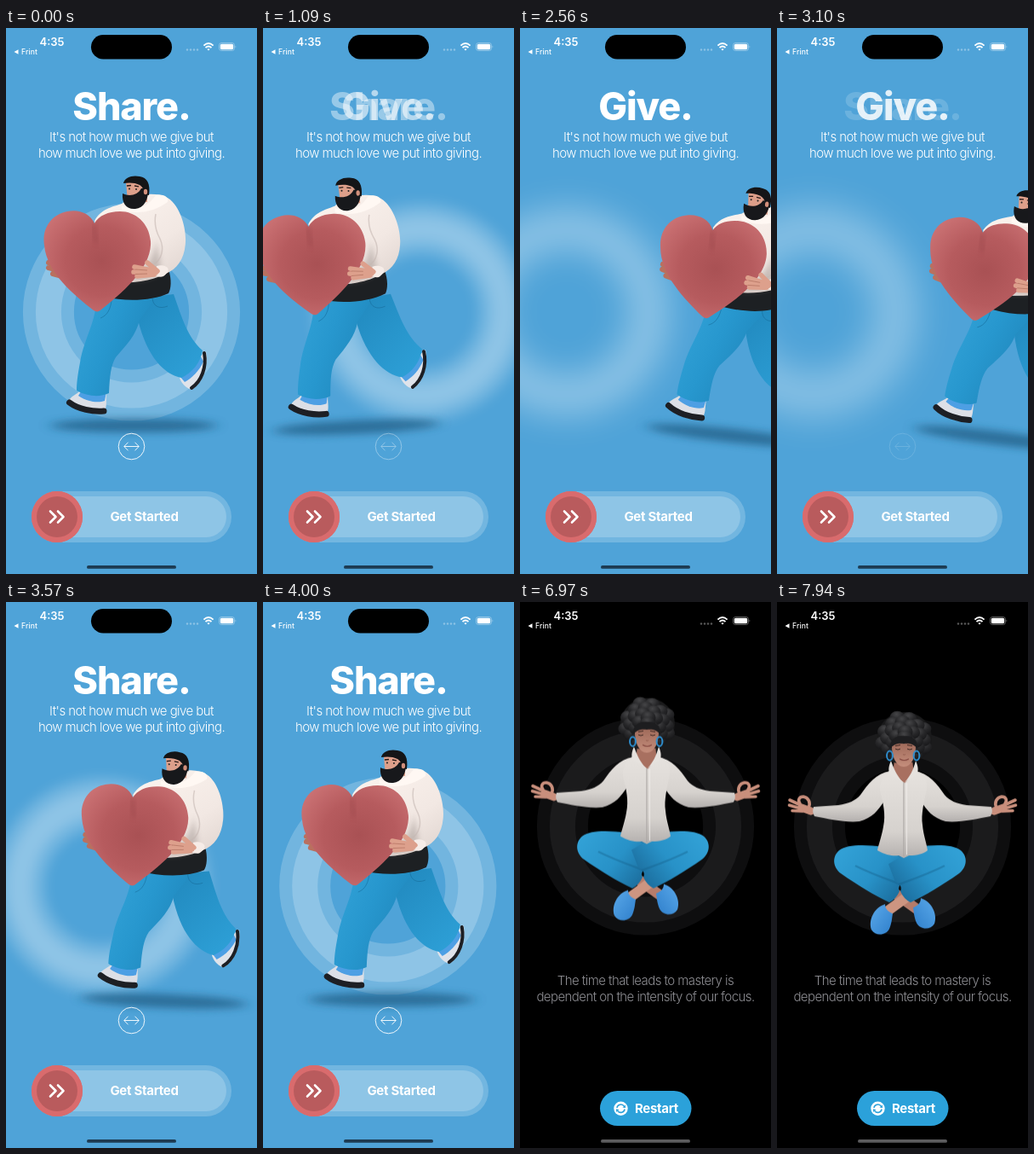
Recreate the animation shown at these times as an HTML page. Size 295x640 px, loop 8 s.

```html
<!DOCTYPE html>
<html lang="en">
<head>
<meta charset="utf-8">
<title>Onboarding</title>
<style>
@property --w { syntax: "<number>"; inherits: true; initial-value: 0; }
@property --give { syntax: "<number>"; inherits: true; initial-value: 0; }
@property --slide { syntax: "<number>"; inherits: true; initial-value: 0; }

html, body { margin: 0; width: 100%; height: 100%; overflow: hidden; background: #000; }
#stage {
  position: absolute; left: 0; top: 0; width: 295px; height: 640px; overflow: hidden;
  font-family: Inter, "Open Sans", sans-serif; color: #fff;
}
#stage > div, .layer { position: absolute; left: 0; top: 0; width: 295px; height: 640px; }
svg { display: block; overflow: visible; }
text { fill: #fff; text-anchor: middle; }
.title { font-size: 45px; font-weight: 800; letter-spacing: -.026em; }
.body { font-size: 15px; font-weight: 300; }
.body text, text.body { letter-spacing: -.038em; }
.label { font-size: 15px; font-weight: 700; letter-spacing: -.02em; }
#home .body text { fill: #8d8d92; }

/* drag distance, title fade and slider all hang on three numbers */
#intro {
  background: #4fa3d8;
  animation: drag 8s infinite, fade 8s linear infinite, slide 8s infinite, leave 8s step-end infinite;
}
#halo {
  transform: translateX(calc(var(--w) * -.75px));
  filter: blur(calc(max(var(--w), -1 * var(--w)) * .15px));
}
#runner {
  transform-origin: 147.5px 333px;
  transform: rotate(calc(var(--w) * .05deg)) translateX(calc(var(--w) * .9px));
}
.give { opacity: var(--give); }
.share { opacity: calc(1 - var(--give)); }
#fill {
  position: absolute; left: 30px; top: 543px; height: 60px; border-radius: 30px;
  width: calc(60px + var(--slide) * 1px); background: #d96b6d;
}
#knob { transform: translateX(calc(var(--slide) * 1px)); }

#home { background: #000; animation: enter 8s step-end infinite; }
#rings { transform-origin: 147.5px 263px; animation: rings 8s infinite; }
#sitter { animation: bob 8s infinite; }
.bar { animation: bar 8s step-end infinite; }

@keyframes drag {
  0% { --w: 0; }
  11% { --w: 0; animation-timing-function: cubic-bezier(.3, .4, .7, .9); }
  13.625% { --w: -51; animation-timing-function: ease-out; }
  14.875% { --w: -63; animation-timing-function: cubic-bezier(.25, .1, .5, 1); }
  25.6% { --w: 0; }
  27.6% { --w: 0; animation-timing-function: cubic-bezier(.2, .2, .6, .85); }
  32% { --w: 124; animation-timing-function: ease-out; }
  38.25% { --w: 150; animation-timing-function: ease-out; }
  50.75%, 100% { --w: 0; }
}
@keyframes fade {
  0%, 11.6% { --give: 0; }
  13.625% { --give: .58; }
  14.2% { --give: .74; }
  17%, 27.75% { --give: 0; }
  30.9%, 38.25% { --give: 1; }
  41.4%, 100% { --give: 0; }
}
@keyframes slide {
  0%, 63.6% { --slide: 0; animation-timing-function: ease-in-out; }
  67.2%, 100% { --slide: 175; }
}
@keyframes leave { 0% { visibility: visible; } 69.375%, 100% { visibility: hidden; } }
@keyframes enter { 0% { visibility: hidden; } 69.375%, 100% { visibility: visible; } }
@keyframes bar { 0% { fill: #1d3b52; } 69.375%, 100% { fill: #5c5c5e; } }
@keyframes rings {
  0%, 69.375% { opacity: 0; transform: scale(.5); filter: blur(7.5px); animation-timing-function: ease-out; }
  81.9%, 100% { opacity: 1; transform: none; filter: blur(0); }
}
@keyframes bob {
  0%, 76.375% { transform: none; animation-timing-function: cubic-bezier(.44, 0, .73, .52); }
  100% { transform: translateY(22.4px); }
}
</style>
</head>
<body>
<div id="stage">

<svg width="0" height="0" style="position:absolute">
  <defs>
    <radialGradient id="heart" cx=".54" cy=".5" r=".62">
      <stop offset="0" stop-color="#a95154"/><stop offset=".55" stop-color="#b65b5e"/><stop offset="1" stop-color="#ca7173"/>
    </radialGradient>
    <linearGradient id="cloth" x1=".2" y1="0" x2=".9" y2="1">
      <stop offset="0" stop-color="#fbf3ee"/><stop offset=".6" stop-color="#f2e8e3"/><stop offset="1" stop-color="#dfd4cf"/>
    </linearGradient>
    <linearGradient id="jean" x1="0" y1="0" x2="1" y2=".5">
      <stop offset="0" stop-color="#33a3d8"/><stop offset=".5" stop-color="#2797ce"/><stop offset="1" stop-color="#1f86bb"/>
    </linearGradient>
    <linearGradient id="jeanBack" x1="0" y1="0" x2=".8" y2="1">
      <stop offset="0" stop-color="#2087bc"/><stop offset="1" stop-color="#2d9fd6"/>
    </linearGradient>
    <linearGradient id="jacket" x1="0" y1="0" x2="0" y2="1">
      <stop offset="0" stop-color="#e6e2de"/><stop offset=".7" stop-color="#d6d2ce"/><stop offset="1" stop-color="#b4b0ae"/>
    </linearGradient>
    <linearGradient id="knee" x1="0" y1="0" x2="1" y2=".6">
      <stop offset="0" stop-color="#34a4d9"/><stop offset=".6" stop-color="#2892c8"/><stop offset="1" stop-color="#1c6f9f"/>
    </linearGradient>
    <linearGradient id="face" x1="0" y1="0" x2="0" y2="1">
      <stop offset="0" stop-color="#9c6757"/><stop offset="1" stop-color="#c58e7c"/>
    </linearGradient>
    <radialGradient id="curl" cx=".45" cy=".25" r=".75">
      <stop offset="0" stop-color="#464648"/><stop offset=".55" stop-color="#272729"/><stop offset="1" stop-color="#18181a"/>
    </radialGradient>
    <linearGradient id="shoe" x1="0" y1="0" x2="1" y2="1">
      <stop offset="0" stop-color="#5aa9ea"/><stop offset="1" stop-color="#2f7fcb"/>
    </linearGradient>
    <filter id="soft" x="-20%" y="-200%" width="140%" height="500%"><feGaussianBlur stdDeviation="8 5"/></filter>
    <filter id="haze" x="-50%" y="-50%" width="200%" height="200%"><feGaussianBlur stdDeviation="3"/></filter>
    <g id="circles" fill="none">
      <circle r="97.6" stroke-width="30"/><circle r="97.6" stroke-width="60"/>
    </g>
  </defs>
</svg>

<div id="intro">
  <svg id="halo" class="layer">
    <use href="#circles" x="147.5" y="333" stroke="#fff" stroke-opacity=".2"/>
  </svg>

  <svg id="runner" class="layer">
    <ellipse cx="150" cy="466" rx="98" ry="8" fill="#1f597f" opacity=".7" filter="url(#soft)"/>
    <!-- back leg -->
    <path d="M212 398 L235 379 C238 396 231 417 218 424 C211 422 206 416 204 410Z" fill="#dfe3ea"/>
    <path d="M205 409 L229 385 L232 391 C227 402 219 410 210 415Z" fill="#4d9fe4"/>
    <path d="M233 381 C236 397 230 414 218 422" fill="none" stroke="#1d1f24" stroke-width="4" stroke-linecap="round"/>
    <path d="M146 318 L197 312 C207 340 213 362 231 378 C229 392 218 405 206 410 C186 406 166 386 155 342Z" fill="url(#jeanBack)"/>
    <!-- front leg -->
    <path d="M88 424 C84 430 75 431 73 439 C80 448 103 455 114 450 C120 446 117 436 118 428Z" fill="#dcdfe6"/>
    <path d="M90 423 L85 431 C95 438 108 440 116 437 L118 426Z" fill="#4d9fe4"/>
    <path d="M74.500 439 C85 447 102 450 115 449" fill="none" stroke="#1d1f24" stroke-width="7" stroke-linecap="round"/>
    <path d="M106 314 C107 344 92 362 87 392 C84 408 83 417 83 425 C95 432 111 433 121 428 C122 408 123 396 129 386 C142 371 153 360 157 342 L178 314Z" fill="url(#jean)"/>
    <path d="M172 317 C173 326 180 330 190 326 M124 320 C122 334 116 338 111 340" fill="none" stroke="#176a98" stroke-width=".8" opacity=".7"/>
    <!-- torso and arm -->
    <path d="M118 298 C150 300 170 296 191 283 C195 295 194 306 191 311 C172 320 140 321 116 315Z" fill="#1d2023"/>
    <path d="M104 226 C112 212 124 210 136 206 C148 194 176 192 188 198 C203 205 212 232 211 251 C210 270 202 282 188 288 C170 297 150 299 118 299Z" fill="url(#cloth)"/>
    <path d="M181 288 C165 296 150 297 140 296 C160 288 176 270 176 246 C178 262 184 276 181 288Z" fill="#8f8480" opacity=".4" filter="url(#haze)"/>
    <path d="M172 278 C184 272 186 258 181 247 C176 238 174 228 176 218" fill="none" stroke="#c5b8b2" stroke-width="1.5" opacity=".6"/>
    <path d="M177 279 C186 276 198 282 185 291 C180 293 178 290 175 290Z" fill="#f6ece7"/>
    <path d="M136 208 C150 215 166 211 176 196 C186 194 192 199 190 204 C176 214 156 220 136 213Z" fill="#fff8f3"/>
    <!-- head -->
    <path d="M141 181 C145 176 163 177 166 186 L166 204 L143 204Z" fill="#dd9f8a"/>
    <path d="M137 194 C145 198 155 196 159 188 L167 188 C168 201 162 211 152 212 C142 213 136 206 137 194Z" fill="#17181b"/>
    <path d="M138 182 C139 175 149 172 157 174 C166 175 170 183 168 196 L163 195 C163 190 160 186 157 184 C152 181 144 181 138 182Z" fill="#141517"/>
    <path d="M142 185 l5 -.5 M151 185 l5 .8" stroke="#2a1b18" stroke-width="1.3"/>
    <circle cx="145" cy="188.5" r="1" fill="#222"/><circle cx="153" cy="189" r="1" fill="#222"/>
    <ellipse cx="164" cy="192" rx="2.2" ry="3.2" fill="#d18f7b"/>
    <!-- hands and heart -->
    <path d="M50 275 L60 277 M50 281 L62 284 M55 288 L66 291" stroke="#b9705f" stroke-width="6" stroke-linecap="round"/>
    <path d="M104 229 C99 217 85 212 72 215 C52 219 42 236 45 255 C48 287 80 313 103 331 C106 333 109 333 112 330 C136 311 172 281 170 250 C168 228 152 215 134 215 C120 215 109 220 104 229Z" fill="url(#heart)"/>
    <path d="M103 230 C104 240 104 245 107 252" fill="none" stroke="#913f45" stroke-width="4" opacity=".5" filter="url(#haze)"/>
    <path d="M178 285 L166 275 M176 285 L151 280 M176 287 L150 286 M174 289 L154 291" stroke="#dda08c" stroke-width="5.6" stroke-linecap="round"/>
    <path d="M152 283 L166 284 M152 288.6 L166 288" stroke="#b67765" stroke-width=".8"/>
  </svg>

  <svg class="layer">
    <text class="title share" x="147.500" y="108">Share.</text>
    <text class="title give" x="147.500" y="108">Give.</text>
    <text class="body" x="147.5" y="133">It's not how much we give but</text>
    <text class="body" x="147.5" y="152">how much love we put into giving.</text>
    <g class="share" transform="translate(147.5 490.5)" fill="none" stroke="#fff" stroke-width=".9">
      <circle r="15.3"/>
      <path d="M-8.5 0H8.5M-4 -4.8L-8.7 0L-4 4.8M4 -4.8L8.7 0L4 4.8"/>
    </g>
    <g fill="#fff" fill-opacity=".2">
      <rect x="30" y="543" width="235" height="60" rx="30"/>
      <rect x="36" y="549" width="223" height="48" rx="24"/>
    </g>
    <text class="label" x="162.5" y="578">Get Started</text>
  </svg>
  <div id="fill"></div>
  <svg id="knob" class="layer">
    <circle cx="60" cy="573" r="30" fill="#d96b6d"/>
    <circle cx="60" cy="573" r="24" fill="#000" fill-opacity=".15"/>
    <path d="M52 566.5l6.5 6.5l-6.5 6.5M61 566.5l6.5 6.5l-6.5 6.5" fill="none" stroke="#fff" stroke-width="2.6" stroke-linecap="round" stroke-linejoin="round"/>
  </svg>
</div>

<div id="home">
  <svg id="rings" class="layer">
    <use href="#circles" x="147.5" y="263" stroke="#8e8e93" stroke-opacity=".1"/>
  </svg>

  <svg id="sitter" class="layer">
    <defs>
      <g id="arm">
        <g fill="none" stroke="#c98f7c" stroke-linecap="round">
          <path d="M40 224L29 220" stroke-width="9"/>
          <path d="M30 218L15 211M28 221L14.5 217M30 224L18 223.5" stroke-width="3.6"/>
          <path d="M37 220C40 214 37 208 31 207C26 207 24 211 27 215" stroke-width="3.6"/>
        </g>
        <path d="M133 177 C116 180 107 192 98 205 C92 212 84 215 72 217 L43 219 Q41 225 44 230 C60 233 82 238 97 236 C112 232 119 223 126 212Z" fill="url(#jacket)"/>
      </g>
      <g id="leg">
        <path d="M124 266 C104 263 82 263 73 270 C64 278 66 290 75 297 C95 311 115 323 132 331 Q140 327 144 318 C141 312 146 309 150 307 L158 286Z" fill="url(#knee)"/>
        <path d="M92 288 C112 298 130 304 146 310" fill="none" stroke="#165f8a" stroke-width="2.5" opacity=".4"/>
      </g>
      <path id="slipper" d="M127 333 C114 337 107 352 111 363 C116 371 128 370 132 362 C135 355 135 350 136 344 C131 342 127 339 127 333Z" fill="url(#shoe)"/>
    </defs>
    <!-- legs -->
    <path d="M120 266 H177 C184 290 166 307 148 308 C130 306 113 292 120 266Z" fill="#1d78ab"/>
    <path d="M138 320 L166 340" stroke="#b67c6b" stroke-width="12" stroke-linecap="round"/>
    <use href="#slipper" transform="matrix(-1 0 0 1 296 -7)"/>
    <use href="#leg"/>
    <path d="M159 320 L130 341" stroke="#cd9581" stroke-width="12" stroke-linecap="round"/>
    <use href="#slipper"/>
    <use href="#leg" transform="matrix(-1 0 0 1 289 0)"/>
    <!-- arms and jacket -->
    <use href="#arm"/>
    <use href="#arm" transform="matrix(-1 0 0 1 295 0)"/>
    <path d="M138 162 H159 L161 184 L149 194 L136 184Z" fill="#a87060"/>
    <path d="M132 177 C124 182 120 190 121 200 C125 215 128 228 125 242 C123 254 119 264 118 270 C128 276 138 277 143 276 L149 279 L155 276 C165 276 172 274 177 270 C176 262 172 252 171 240 C169 228 173 212 176 198 C177 186 172 180 164 177 L150 191Z" fill="url(#jacket)"/>
    <path d="M134 165 C131 171 130 178 134 182 L148 190 C142 184 138 176 134 165ZM163 165 C166 171 167 178 163 182 L150 190 C156 184 160 176 163 165Z" fill="#e6e2de"/>
    <path d="M149 190 V277" stroke="#aaa5a2" stroke-width="1.1"/>
    <path d="M152.500 191 V275" stroke="#f1eeeb" stroke-width=".8"/>
    <!-- head -->
    <g id="hair"></g>
    <path d="M135 148 C135 138 163 138 163 148 C163 160 158 172 149 172 C140 172 135 160 135 148Z" fill="url(#face)"/>
    <g fill="none" stroke="#2f8fd0" stroke-width="2">
      <ellipse cx="132.500" cy="159" rx="3.4" ry="5.4"/><ellipse cx="164" cy="159" rx="3.4" ry="5.4"/>
    </g>
    <path d="M132 152 C133 138 141 135 150 136 C159 135 165 140 166 152 C161 145 155 144 149 145 C143 144 137 145 132 152Z" fill="#1d1d1f"/>
    <path d="M139 151q3 2 6 0M153 151q3 2 6 0M139 147.500l6-1M153 146.500l6 1" fill="none" stroke="#3a2520" stroke-width="1"/>
    <path d="M148 157.500q1.500 1.200 3 0" fill="none" stroke="#945d4f" stroke-width="1"/>
    <path d="M144.500 163q5 3 10 0" fill="none" stroke="#7f433c" stroke-width="1.2" stroke-linecap="round"/>
  </svg>

  <svg class="layer">
    <g class="body">
      <text x="147.5" y="449">The time that leads to mastery is</text>
      <text x="147.5" y="468">dependent on the intensity of our focus.</text>
    </g>
    <rect x="94" y="573" width="107.500" height="41" rx="20.500" fill="#2ba1da"/>
    <g transform="translate(118.500 593.700)" fill="none" stroke="#2ba1da" stroke-width="1.6">
      <circle r="8.2" fill="#fff" stroke="none"/>
      <g id="turn">
        <path d="M-4.600 -.8A4.700 4.700 0 0 1 3.600 -3"/>
        <path d="M2 -1.200L5.600 -.6L5.200 -4.400Z" fill="#2ba1da" stroke="none"/>
      </g>
      <use href="#turn" transform="rotate(180)"/>
    </g>
    <text class="label" x="160.5" y="599">Restart</text>
  </svg>
</div>

<svg class="layer">
  <rect x="100" y="8" width="95" height="28.500" rx="14.250"/>
  <text x="54" y="21" style="font-size:13px;font-weight:600">4:35</text>
  <path d="M9.500 28L14.500 25.200V30.800Z" fill="#fff"/>
  <text x="18" y="31" style="font-size:8.6px;font-weight:500;letter-spacing:.01em;text-anchor:start">Frint</text>
  <g fill="#fff" fill-opacity=".35">
    <circle cx="213" cy="25.500" r="1.200"/><circle cx="217" cy="25.500" r="1.200"/>
    <circle cx="221" cy="25.500" r="1.200"/><circle cx="225" cy="25.500" r="1.200"/>
  </g>
  <g fill="none" stroke="#fff" stroke-width="1.900">
    <path d="M232.400 20.600Q238 15.600 243.600 20.600M234.500 23.100Q238 20 241.500 23.100"/>
    <path d="M236.300 24.700L238 26.500L239.700 24.700Q238 23.600 236.300 24.700Z" fill="#fff" stroke="none"/>
  </g>
  <rect x="250.500" y="17.500" width="18" height="9" rx="2.800" fill="none" stroke="#fff" stroke-opacity=".45" stroke-width=".8"/>
  <rect x="251.800" y="18.800" width="15.400" height="6.400" rx="1.600" fill="#fff"/>
  <path d="M269.600 20.500q1.500 1.500 0 3Z" fill="#fff" fill-opacity=".5"/>
  <rect class="bar" x="95" y="630" width="105" height="3.800" rx="1.900"/>
</svg>
</div>

<script>
// Curls packed on a sunflower spiral, outermost first.
const hair = document.getElementById("hair");
const add = (tag, attrs) => {
  const el = document.createElementNS("http://www.w3.org/2000/svg", tag);
  for (const k in attrs) el.setAttribute(k, attrs[k]);
  hair.append(el);
};
add("ellipse", { cx: 150, cy: 138, rx: 32, ry: 30, fill: "#1a1a1b" });
for (let i = 30; i >= 0; i--) {
  const a = i * 2.4, r = Math.sqrt(i / 30);
  add("ellipse", {
    cx: 150 + 26.5 * r * Math.cos(a), cy: 137.5 + 25.5 * r * Math.sin(a),
    rx: 9, ry: 7.6, fill: "url(#curl)"
  });
}
</script>
</body>
</html>
```
